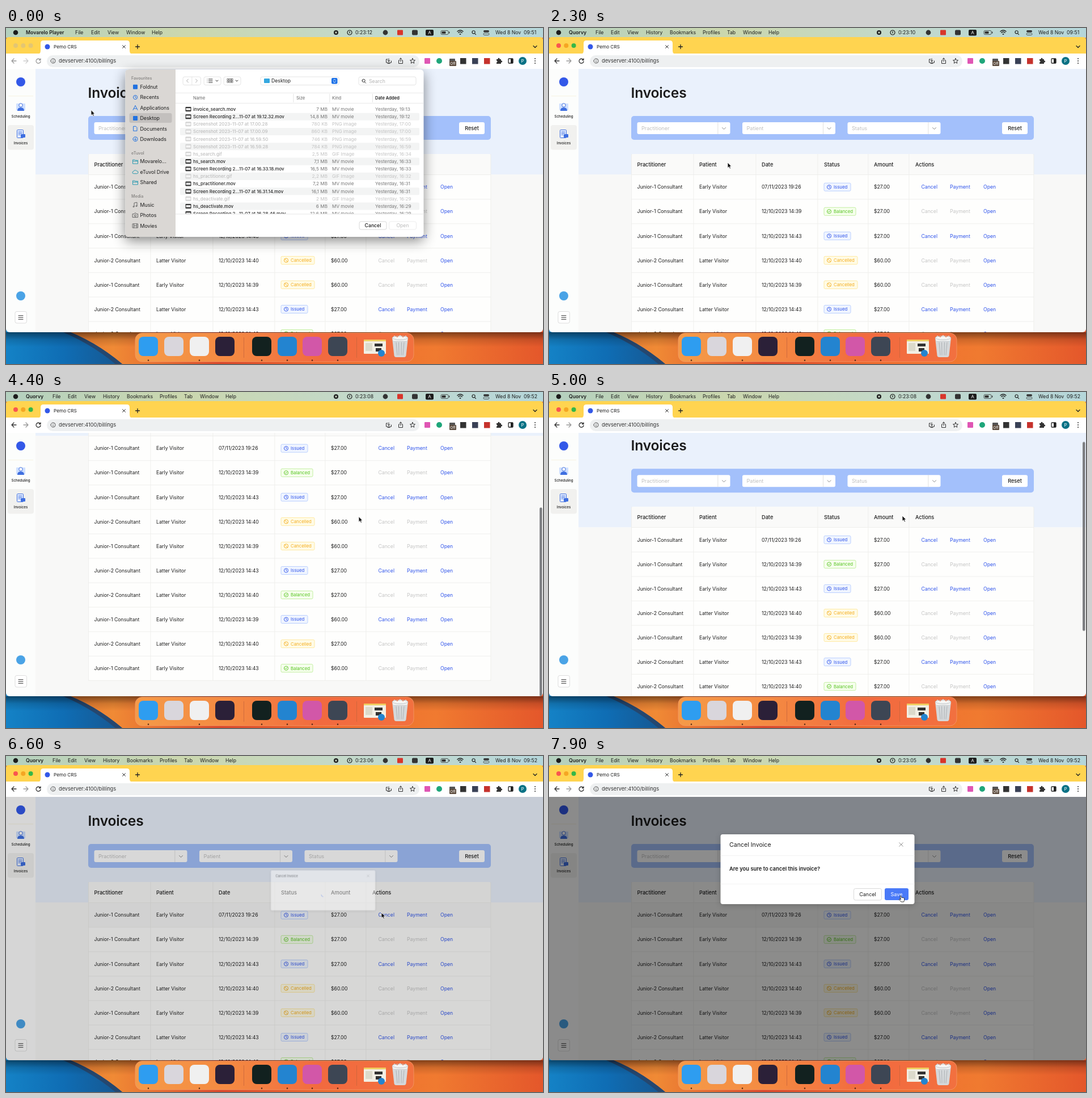
Recreate the animation shown at these times as an HTML page. Size 947x592 px, loop 8 s.

```html
<!DOCTYPE html>
<html lang="en">
<head>
<meta charset="utf-8">
<title>Invoices</title>
<style>
html,body{margin:0;width:100%;height:100%;overflow:hidden;background:#fff}
svg{display:block;width:947px;height:592px;font:8.7px Inter,sans-serif;fill:#1c1c1c}
text{white-space:pre}
.b{font-weight:600}.m{font-weight:500}
.h1{font-size:24.6px;font-weight:600;letter-spacing:-.15px}
.th{font-size:9.2px;font-weight:500}
.ph{font-size:9.1px;fill:#bfbfbf}
.tag{font-size:7.8px}
.file{font-size:7.95px;font-weight:500}
.dlg{filter:drop-shadow(0 7px 11px #0007)}
.pop{filter:drop-shadow(0 2px 5px #0003)}
.line{fill:none;stroke-linecap:round;stroke-linejoin:round}
.anim{animation:8s linear infinite}
#page{animation-name:scroll}
#thumb{animation-name:thumb}
#cursor{animation-name:move}
#mask{animation-name:mask}
#modal{animation-name:zoom;transform-origin:659px 275.6px}
#spin{animation:spin 1.2s linear infinite;transform-origin:473.5px 218px}
@keyframes scroll{
  0%,43.5%{transform:none;animation-timing-function:ease-in-out}
  52%,55%{transform:translateY(-181px);animation-timing-function:ease-in-out}
  62.5%{transform:translateY(-20px);animation-timing-function:ease-out}
  65%,to{transform:none}}
@keyframes thumb{
  0%,43.5%{transform:none;animation-timing-function:ease-in-out}
  52%,55%{transform:translateY(130px);animation-timing-function:ease-in-out}
  62.5%{transform:translateY(14.5px);animation-timing-function:ease-out}
  65%,to{transform:none}}
@keyframes move{
  0%,8.5%{transform:translate(150px,144.5px);animation-timing-function:ease-in}
  28.75%{transform:translate(314.5px,237px);animation-timing-function:ease-out}
  41.25%{transform:translate(604px,270.5px)}
  48%{transform:translate(621px,221px)}
  62.5%{transform:translate(623px,218px);animation-timing-function:ease-in-out}
  75%{transform:translate(657.5px,273px)}
  79%,86%{transform:translate(662px,276px);animation-timing-function:ease-in-out}
  96.5%,to{transform:translate(620px,246px)}}
@keyframes mask{0%,81.25%{opacity:0}85%,to{opacity:1}}
@keyframes zoom{
  0%,81.4%{opacity:0;transform:scale(.2)}
  82.5%{opacity:.47;transform:scale(.535)}
  83.75%{opacity:.9;transform:scale(.9)}
  85.2%,to{opacity:1;transform:none}}
@keyframes spin{to{transform:rotate(1turn)}}
</style>
</head>
<body>
<script>
let css = '', count = 0;

const R = (x, y, w, h, fill, rx = 0, more = '') =>
  `<rect x="${x}" y="${y}" width="${w}" height="${h}" rx="${rx}" fill="${fill}" ${more}/>`;
const C = (x, y, r, fill, more = '') => `<circle cx="${x}" cy="${y}" r="${r}" fill="${fill}" ${more}/>`;
const T = (x, y, s, cls = '', more = '') => `<text x="${x}" y="${y}" class="${cls}" ${more}>${s}</text>`;
const mid = 'text-anchor="middle"';
// Stroked icon drawn around its own centre
const I = (x, y, d, color = '#333', w = 1) =>
  `<path class="line" transform="translate(${x} ${y})" d="${d}" stroke="${color}" stroke-width="${w}"/>`;
const dot = r => `M${-r} 0a${r} ${r} 0 1 0 ${2 * r} 0a${r} ${r} 0 1 0 ${-2 * r} 0`;
const frame = 'stroke-width=".8" stroke=';

// Shows its content only from a to b, in ms of the loop
function show(a, b, body) {
  const name = 'show' + count++, p = a / 80, q = b / 80;
  css += `@keyframes ${name}{0%{opacity:${a ? 0 : 1}}${p}%{opacity:1}${q}%,to{opacity:${b < 8000 ? 0 : 1}}}`;
  return `<g style="animation:${name} 8s step-end infinite">${body}</g>`;
}

const icon = {
  down: 'M-3 -1.5L0 1.5L3 -1.5',
  cross: 'M-2.5 -2.5L2.5 2.5M2.5 -2.5L-2.5 2.5',
  clock: dot(3.6) + 'M0 -2V0L1.6 1',
  check: dot(3.6) + 'M-1.6 0L-.4 1.3L1.7 -1.2',
  ban: dot(3.6) + 'M-2.5 -2.5L2.5 2.5',
  apps: 'M-4 4L0 -4L4 4M-2.8 1.5H2.8',
  doc: 'M-3 -4H1L3 -2V4H-3Z',
  save: dot(4) + 'M0 -2V2M-1.6 .5L0 2L1.6 .5',
  folder: 'M-4.5 3.5V-3H-1L0 -2H4.5V3.5ZM-4.5 -.5H4.5',
  cloud: 'M-3 3a2 2 0 0 1 0 -4a3 3 0 0 1 5.5 -.5a2.2 2.2 0 0 1 .5 4.5Z',
  note: 'M-2 3V-3.5L3 -4.5V2' + 'M-2 3a1 1 0 1 1 -1 -1ZM3 2a1 1 0 1 1 -1 -1Z',
  camera: 'M-4.5 -2.5H-2L-1 -4H1L2 -2.5H4.5V3.5H-4.5ZM-1.7 .5a1.7 1.7 0 1 0 3.4 0a1.7 1.7 0 1 0 -3.4 0',
  film: 'M-4.5 -3.5H4.5V3.5H-4.5ZM-2.5 -3.5V3.5M2.5 -3.5V3.5M-2.5 0H2.5',
  lens: 'M-3 -.7a2.6 2.6 0 1 0 5.2 0a2.6 2.6 0 1 0 -5.2 0M1.3 1.4L3.6 3.7'
};

function wallpaper() {
  return R(0, 0, 947, 592, 'url(#sunset)') +
    '<path d="M0 530H98Q155 550 205 592H0Z" fill="url(#sea)"/>' +
    '<path d="M98 530Q155 550 205 592H193Q146 553 86 530Z" fill="#25476f"/>' +
    R(0, 536, 947, 26, 'url(#shade)');
}

function menuBar() {
  const menu = (names, xs) => names.split(' ').map((s, i) => T(xs[i], 10.7, s)).join('');
  let s = R(0, 0, 947, 17, 'url(#bar)') + C(17, 8, 4.3, '#1c1c1c') +
    show(0, 100, T(35, 10.7, 'Movarelo Player', 'b') +
      menu('File Edit View Window Help', [122, 150, 179, 212, 257])) +
    show(100, 8000, T(35, 10.7, 'Quorvy', 'b') +
      menu('File Edit View History Bookmarks Profiles Tab Window Help',
        [82, 109, 138, 171, 213, 271, 314, 342, 387]));
  s += C(582, 8, 4, '#1c1c1c') + R(580.5, 6.5, 3, 3, '#c6d4bf') +
    I(606, 8, dot(4) + 'M0 -2V1', '#1c1c1c', 1.2);
  // Countdown, one second per step
  for (let n = 12; n >= 5; n--) {
    const at = 1150 + (11 - n) * 1000;
    s += show(n == 12 ? 0 : at, Math.min(8000, at + 1000), T(616, 10.7, '0:23:' + String(n).padStart(2, '0')));
  }
  s += C(669, 8, 4.4, '#333') + R(690, 3.5, 10, 9, '#d8352b', 1) + R(716, 3.5, 10, 9, '#333', 2) +
    R(740, 3, 14, 10.5, '#1c1c1c', 2) + T(747, 11, 'A', '', mid + ' style="fill:#fff;font-size:8px"') +
    R(767, 4.5, 13, 7, 'none', 2, frame + '"#333"') + R(768.5, 6, 7, 4, '#333', 1) + R(781, 6.5, 1.3, 3, '#333') +
    I(801, 8, 'M-5 -2Q0 -6 5 -2M-3.2 .2Q0 -2.5 3.2 .2M-.8 2.6L0 3.2L.8 2.6', '#1c1c1c', 1.4) +
    I(825, 8, icon.lens, '#1c1c1c', 1.1) +
    R(842, 4, 10, 3.4, '#333', 1.7) + R(842, 9, 10, 3.4, 'none', 1.7, frame + '"#333"');
  const clock = m => T(863, 10.7, 'Wed 8 Nov  09:' + m, '', 'style="font-size:8.7px"');
  return s + show(0, 4150, clock(51)) + show(4150, 8000, clock(52));
}

function browser() {
  const lights = cs => cs.map((c, i) => C(17 + 13.3 * i, 31, 4, c)).join('');
  let s = '<path d="M0 46V21Q0 16 6 16H941Q947 16 947 21V46Z" fill="#ffd450"/>' +
    show(0, 100, lights(['#e3c673', '#e3c673', '#e3c673'])) +
    show(100, 8000, lights(['#f9564f', '#f5a623', '#35b748'])) +
    '<path d="M55 46Q61 46 61 40V27Q61 22 66 22H213Q218 22 218 27V40Q218 46 224 46Z" fill="#fff"/>' +
    C(73, 33, 4.5, '#3358e8') + T(84, 36, 'Pemo CRS', '', 'style="font-size:8.2px"') +
    I(208, 33, icon.cross) + I(232, 33, 'M-3.5 0H3.5M0 -3.5V3.5', '#222', 1.3) + I(933, 33, icon.down, '#222', 1.3);
  s += R(0, 45, 947, 27, '#fff') + R(72, 48, 657, 21, '#eef0f1', 10.5) +
    I(14, 58, 'M4 0H-4M0 -4L-4 0L0 4', '#333', 1.3) + I(35, 58, 'M-4 0H4M0 -4L4 0L0 4', '#999', 1.3) +
    I(57, 58, 'M3 -2.5A4 4 0 1 0 4 1M4 -4V-1.5H1.5', '#333', 1.3) +
    show(0, 100, R(6, 48, 58, 20, '#fff', 0, 'opacity=".5"')) +
    I(83, 58, dot(4) + 'M0 -.3V2M0 -2V-2', '#555') +
    T(93, 61.2, 'devserver:4100/billings', '', 'style="font-size:9.2px;fill:#333"') +
    I(675, 58, 'M0 -4V1M-2 -1L0 1L2 -1M-2 -3H-4.5V3H4.5V0M-2 4.5H2') +
    I(696, 58, 'M0 1V-5M-2 -3L0 -5L2 -3M-2 -1H-3.5V4.5H3.5V-1H2') +
    I(717, 58, 'M0 -4.5L1.3 -1.4L4.5 -1.2L2 1L2.8 4.2L0 2.4L-2.8 4.2L-2 1L-4.5 -1.2L-1.3 -1.4Z');
  s += R(738, 53, 10, 10, '#e056b4', 1) + C(764, 58, 5, '#1fa67a') + R(782, 54, 10, 7, '#555', 1) +
    R(782, 58, 12, 9, '#5b4a3c', 1) + T(788, 65, 'Off', '', mid + ' style="font-size:6.5px;fill:#fff"') +
    R(801, 53, 10.5, 10.5, '#333') + R(822, 53, 10.5, 10.5, '#3a4156') + R(843, 53, 10.5, 10.5, '#c6322c') +
    '<path d="M865 55H867.5a1.6 1.6 0 1 1 3 0H873V57.5a1.6 1.6 0 1 1 0 3V63H865V60.5a1.5 1.5 0 1 0 0 -3Z" fill="#333"/>' +
    R(886, 54, 8, 8, 'none', 1, 'stroke="#222" stroke-width="1.3"') + R(890, 54, 4, 8, '#222') +
    C(911, 58, 7, '#0b7285') + T(911, 61, 'P', '', mid + ' style="fill:#fff;font-size:8px"') +
    [54, 58, 62].map(y => C(933, y, 1, '#333')).join('');
  return s;
}

function sideNav() {
  const blue = '#3f6fe0', small = mid + ' style="font-size:6.2px"';
  return R(0, 72, 52, 464, '#fcfdfc') + C(26, 95, 8, '#3358e8') + R(4, 119.5, 44, .8, '#f3efda') +
    R(3, 171, 46, 43.5, '#f1f1ef', 4) +
    R(18, 133, 16, 12, '#cfe0ff', 1) + C(26, 136, 3.2, '#fff', `stroke="${blue}"`) +
    `<path d="M20 146Q20 140 26 140Q32 140 32 146Z" fill="${blue}"/>` +
    T(26, 157.5, 'Scheduling', 'm', small) +
    R(19.5, 179.5, 11, 14, '#e5eeff', 1, `stroke="${blue}"`) +
    I(25, 184, 'M-3 -1H3M-3 1.5H3M-3 4H0', blue) + R(26, 187, 8, 6, blue, 1) +
    T(26, 205, 'Invoices', 'm', small) +
    C(26, 472, 8, '#4aa3e6') + R(16, 499.5, 20.5, 20.5, '#fff', 3, frame + '"#d5d5d5"') +
    I(26, 510, 'M-4 -3.3H4M-4 0H4M-4 3.3H4', '#333');
}

const tags = {
  Issued: ['#2f54eb', '#f0f5ff', '#adc6ff', icon.clock, 47],
  Balanced: ['#58c322', '#f6ffed', '#b7eb8f', icon.check, 56],
  Cancelled: ['#f5ad1e', '#fffbe6', '#ffe58f', icon.ban, 59]
};

function tag(y, name) {
  const [ink, fill, edge, shape, w] = tags[name];
  return R(485, y - 7, w, 14, fill, 2, frame + `"${edge}"`) + I(494, y, shape, ink, .9) +
    T(502, y + 2.9, name, 'tag', `fill="${ink}"`);
}

function page() {
  let s = R(52, 72, 895, 700, '#f8f8f7') + R(52, 72, 895, 186, '#eaf1fc') + T(144.5, 123, 'Invoices', 'h1') +
    R(145, 155, 710, 42, '#a3c0fb', 5);
  ['Practitioner', 'Patient', 'Status'].forEach((name, i) => {
    const x = 155.5 + 185.5 * i;
    s += R(x, 166, 164, 21, '#fff', 3) + R(x + 142, 166, .8, 21, '#d9d9d9') +
      T(x + 7.5, 179.8, name, 'ph') + I(x + 153, 177, icon.down, '#888');
  });
  s += R(799, 166, 45, 21, '#fff', 3) + T(821.5, 179.8, 'Reset', 'm', mid + ' style="font-size:9.2px"');

  const cols = [155.5, 265, 375, 485, 573, 646];
  s += R(145, 222, 710, 467, '#fefefd', 4) + R(145, 222, 710, 36.5, '#fafaf9', 4);
  'Practitioner Patient Date Status Amount Actions'.split(' ').forEach((h, i) => s += T(cols[i], 243.8, h, 'th'));
  const hover = R(145, 259, 710, 42.5, '#f7f7f6');
  s += show(3100, 3600, hover) + show(5600, 8000, hover);
  const rows = [
    [1, '07/11/2023 19:26', 'Issued', 27], [1, '14:39', 'Balanced', 27], [1, '14:43', 'Issued', 27],
    [2, '14:40', 'Cancelled', 60], [1, '14:39', 'Cancelled', 60], [2, '14:43', 'Issued', 27],
    [2, '14:40', 'Balanced', 27], [1, '14:39', 'Issued', 60], [2, '14:40', 'Cancelled', 27], [1, '14:43', 'Balanced', 60]
  ];
  rows.forEach(([who, date, state, sum], i) => {
    const y = 280.2 + 43.05 * i, t = y + 3.2, ink = state == 'Issued' ? '#2f54eb' : '#c4c4c4';
    s += T(cols[0], t, `Junior-${who} Consultant`) + T(cols[1], t, who == 1 ? 'Early Visitor' : 'Latter Visitor') +
      T(cols[2], t, date.length > 5 ? date : '12/10/2023 ' + date) + tag(y, state) + T(cols[4], t, `$${sum}.00`) +
      T(656.5, t, 'Cancel', '', `fill="${ink}"`) + T(707, t, 'Payment', '', `fill="${ink}"`) +
      T(766, t, 'Open', '', 'fill="#2f54eb"') + R(145, y + 21.2, 710, .8, '#ecece9');
  });
  s += R(145, 258, 710, .8, '#ecece9');
  [145, 254.5, 364.5, 473.5, 562.5, 634.5, 854.5].forEach(x => s += R(x, 222, .8, 467, '#ecece9'));
  return `<g clip-path="url(#view)"><g id="page" class="anim">${s}</g></g>` +
    show(3500, 6400, R(941, 73.5, 4.5, 333, '#7d7f82', 2.2, 'id="thumb" class="anim"'));
}

function modal() {
  const box = h => R(302.5, 138, 342, h, '#fff', 4, 'class="pop"') + T(318, 160.3, 'Cancel Invoice', '', 'style="font-size:10.6px"') +
    I(621, 156, 'M-3.3 -3.3L3.3 3.3M3.3 -3.3L-3.3 3.3', '#888', .9) + R(302.5, 175.3, 342, .7, '#eee');
  return R(0, 72, 947, 464, '#000', 0, 'id="mask" class="anim" fill-opacity=".45"') +
    '<g id="modal" class="anim">' +
    show(6400, 6850, box(131) + `<g id="spin">${I(473.5, 218, 'M0 -6A6 6 0 0 1 6 0', '#3366ff', 1.3)}</g>`) +
    show(6850, 8000, box(123) + T(318, 202, 'Are you sure to cancel this invoice?', 'b', 'style="font-size:9.4px"') +
      R(302.5, 225.3, 342, .7, '#eee') + R(537.5, 233.5, 49, 20.5, '#fff', 3, frame + '"#d0d0d0"') +
      T(562, 247, 'Cancel', '', mid + ' style="font-size:9px"') + R(592, 233, 42, 21, '#4a7af8', 3) +
      T(613, 247, 'Save', '', mid + ' style="font-size:9px;fill:#fff"')) + '</g>';
}

function fileDialog() {
  let s = R(210.5, 73, 526, 295, '#fff', 6) +
    '<path d="M299 73H216.5Q210.5 73 210.5 79V362Q210.5 368 216.5 368H299Z" fill="#dad7d4"/>' +
    R(217.5, 150, 75, 17, '#c3c0be', 3);
  const group = (y, name, color, items) => {
    s += T(221, y, name, 'b', 'style="font-size:7.2px;fill:#8b8987"');
    items.forEach(([label, shape], i) => {
      const cy = y + 12.7 + 18.4 * i;
      s += (shape ? I(228, cy, icon[shape], color) : R(224, cy - 4, 8, 8, color, 1)) + T(236.5, cy + 3.2, label, '', 'style="font-size:8.8px"');
    });
  };
  group(91, 'Favourites', '#2272e0', [['Foldnut'], ['Recents', 'clock'], ['Applications', 'apps'], ['Desktop'],
    ['Documents', 'doc'], ['Downloads', 'save']]);
  group(222.5, 'eTuvol', '#2c9bb0', [['Movarelo...', 'folder'], ['eTuvol Drive', 'cloud'], ['Shared', 'folder']]);
  group(299, 'Media', '#666', [['Music', 'note'], ['Photos', 'camera'], ['Movies', 'film']]);

  const edge = frame + '"#dedede"';
  s += R(312, 86, 31.5, 14.5, '#fff', 3, edge) + R(327.5, 86, .8, 14.5, '#dedede') +
    I(320, 93, 'M1.5 -3L-1.5 0L1.5 3', '#aaa') + I(336, 93, 'M-1.5 -3L1.5 0L-1.5 3', '#aaa') +
    R(349, 86, 30, 14.5, '#fff', 3, edge) + I(359, 93, 'M-1.5 -3H5M-1.5 0H5M-1.5 3H5M-4 -3H-4M-4 0H-4M-4 3H-4') +
    I(372, 93, 'M-2 -1L0 1L2 -1') + R(384, 86, 30, 14.5, '#fff', 3, edge) + I(407, 93, 'M-2 -1L0 1L2 -1');
  for (let i = 0; i < 6; i++) s += R(390 + i % 3 * 3.7, 89.5 + (i > 2) * 4, 2.6, 2.6, 'none', 0, 'stroke="#444" stroke-width=".7"');
  s += R(449, 86, 138, 14.5, '#fff', 3, edge) + R(455, 89, 10, 8, '#35a8e0', 1) + T(468, 96.3, 'Desktop') +
    R(574, 88, 10.5, 10.5, '#1d72e8', 2) + I(579.3, 93.2, 'M-2 -1L0 -3L2 -1M-2 1L0 3L2 1', '#fff') +
    R(622, 86, 101, 14.5, '#fff', 3, edge) + I(631, 93.5, icon.lens, '#333') + T(640, 96.5, 'Search', '', 'fill="#b5b5b5"') +
    R(299, 114, 437.5, .8, '#e4e4e4') + R(299, 132, 437.5, .8, '#e4e4e4');
  [[330, 'Name'], [512, 'Size'], [575, 'Kind'], [651, 'Date Added']].forEach(([x, h], i) =>
    s += T(x, 126, h, i > 2 ? 'b' : '', `style="font-size:7.6px" fill="${i > 2 ? '#222' : '#666'}"`));
  [506.5, 570.5, 646].forEach(x => s += R(x, 116, .8, 15, '#dcdcdc'));

  const rec = t => 'Screen Recording 2...11-07 at ' + t + '.mov', shot = t => 'Screenshot 2023-11-07 at ' + t;
  const files = [
    ['invoice_search.mov', '7 MB', '19:13'], [rec('19.12.32'), '14,8 MB', '19:12'],
    [shot('17.00.28'), '780 KB', '17:00'], [shot('17.00.09'), '860 KB', '17:00'],
    [shot('16.59.50'), '746 KB', '16:59'], [shot('16.59.28'), '784 KB', '16:59'],
    ['hs_search.gif', '2,5 MB', '16:34'], ['hs_search.mov', '7,1 MB', '16:33'], [rec('16.33.18'), '16,5 MB', '16:33'],
    ['hs_practitioner.gif', '2,2 MB', '16:32'], ['hs_practitioner.mov', '7,2 MB', '16:31'],
    [rec('16.31.14'), '16,1 MB', '16:31'], ['hs_deactivate.gif', '2 MB', '16:29'],
    ['hs_deactivate.mov', '6 MB', '16:29'], [rec('16.28.46'), '12,6 MB', '16:29']
  ];
  let list = '';
  files.forEach(([name, size, time], i) => {
    const y = 143 + 13.15 * i, movie = name.endsWith('.mov'), ink = `fill="${movie ? '#262626' : '#bdbdbd'}"`;
    const kind = movie ? 'MV movie' : name.endsWith('.gif') ? 'GIF Image' : 'PNG image';
    const soft = `style="font-size:8.2px" fill="${movie ? '#777' : '#c2c2c2'}"`;
    list += (i % 2 ? R(307, y - 6.5, 422, 13.1, '#f3f4f4', 2) : '') +
      R(316.5, y - 4, 10, 8, movie ? '#2b2b2b' : '#d0d0d0', 1) + R(317.5, y - 2, 8, 4, movie ? '#e4e4e4' : '#f5f5f5') +
      T(330, y + 2.9, name, 'file', ink) + T(567, y + 2.9, size, '', 'text-anchor="end" ' + soft) +
      T(575, y + 2.9, kind, '', soft) + T(651, y + 2.9, 'Yesterday, ' + time, '', soft);
  });
  s += `<g clip-path="url(#list)">${list}</g>` + R(299, 327.5, 437.5, .8, '#e2e2e2') +
    R(623, 341, 48, 14, '#fff', 3, frame + '"#cfcfcf"') + T(647, 351, 'Cancel', 'm', mid) +
    R(675.5, 341, 48, 14, '#fff', 3, frame + '"#e8e8e8"') + T(699.5, 351, 'Open', '', mid + ' fill="#bbb"');
  return show(0, 100, `<g class="dlg">${s}</g>`);
}

function dock() {
  const apps = [[251, '#2e9df0'], [296, '#d9d6dc'], [341, '#f0f0f0'], [386, '#2b2038'], [451, '#12211f'],
    [496, '#2384d0'], [540, '#d257a8'], [585, '#3d4654']];
  let s = R(228, 537.5, 491, 50.5, 'url(#shelf)', 12, 'stroke="#f49a68" stroke-width=".8"');
  apps.forEach(([x, c]) => s += R(x - 17, 544, 34, 34, c, 8));
  [251, 341, 451, 496, 540, 585].forEach(x => s += C(x, 585.5, 1.2, '#4a2413'));
  s += [419, 618].map(x => R(x, 545, .8, 36, '#c9663c')).join('') +
    R(631, 549, 39, 25, '#f2efe4', 1) + R(631, 549, 39, 3, '#f0cf62') + R(634, 555, 12, 14, '#dcdacb') +
    R(650, 556, 14, 5, '#333') + R(652, 564, 10, 6, '#333') + C(662, 573, 6, '#2384d0');
  return s + '<path d="M681 546L684.5 577Q685 580 688 580H702Q705 580 705.5 577L709 546Z" fill="#d5d8da"/>' +
    '<path d="M681 546L685 542L690 545L695 541L700 545L705 542L709 546L707 551H683Z" fill="#f7f7f5"/>' +
    I(695, 563, 'M-7 -9L-5 13M-2.5 -9L-2 13M2.5 -9L2 13M7 -9L5 13', '#a9aeb2', .9) +
    '<ellipse cx="695" cy="546" rx="14" ry="3.2" fill="none" stroke="#b9bec2"/>';
}

function cursor() {
  const arrow = '<path d="M0 0V9.5L2.2 7.6L3.9 11L5.5 10.2L3.9 7L6.8 6.8Z" fill="#111" stroke="#fff" stroke-width=".8"/>';
  const hand = '<path d="M-.8 .8Q0 -.4 1 .6L2 3.8Q3 3 3.8 3.8Q4.8 3.2 5.3 4Q6.6 3.7 6.7 5.2L6.5 8.6L5.6 11H1.2L-2.4 7.2Q-2.4 5.8 -1 6.2L.4 7Z" fill="#fff" stroke="#222" stroke-width=".9" stroke-linejoin="round"/>';
  return '<g id="cursor" class="anim">' + show(0, 5900, arrow) + show(5900, 6500, hand) +
    show(6500, 7500, arrow) + show(7500, 8000, hand) + '</g>';
}

const grad = (id, stops, more = '') => `<linearGradient id="${id}" ${more}>` +
  stops.map((c, i) => `<stop offset="${i / (stops.length - 1)}" stop-color="${c}"/>`).join('') + '</linearGradient>';
const clip = (id, x, y, w, h, r = 0) => `<clipPath id="${id}">${R(x, y, w, h, '#000', r)}</clipPath>`;

const defs = '<defs>' + grad('sunset', ['#d9652c', '#f08a35', '#d9482b', '#ee6a2e', '#f07a30', '#e4572b']) +
  grad('sea', ['#1482c6', '#0f6db4', '#17568f']) + grad('shelf', ['#f59a48', '#f48a42', '#f26a3f', '#f2703f']) +
  grad('shade', ['#0007', '#0002', '#0000'], 'x2="0" y2="1"') +
  grad('bar', ['#b4d0bf', '#cbd7ae', '#c2d9cc', '#b5d6da']) +
  clip('view', 52, 72, 895, 464) + clip('list', 299, 133, 437, 194.5) + clip('win', 0, 10, 947, 526, 6) + '</defs>';

const scene = wallpaper() + menuBar() +
  `<g clip-path="url(#win)">${browser() + page() + sideNav() + modal()}</g>` +
  fileDialog() + dock() + cursor();

const style = document.createElement('style');
style.textContent = css;
document.head.append(style);
document.body.innerHTML = `<svg viewBox="0 0 947 592">${defs}${scene}</svg>`;
</script>
</body>
</html>
```
